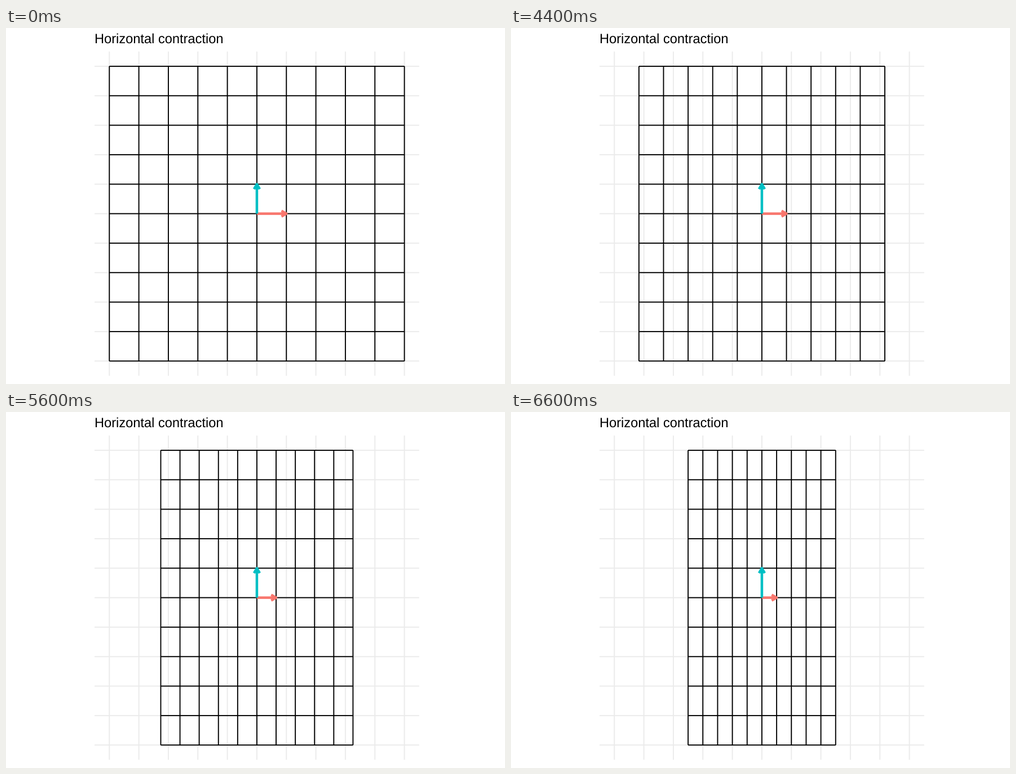
These frames come from a looping animation (885 px wide and 632 px high, 10 s). A matplotlib script:

```python
import numpy as np
import matplotlib.pyplot as plt
from matplotlib.animation import FuncAnimation
from matplotlib.collections import LineCollection

WIDTH, HEIGHT, DPI = 885, 632, 100
PT = 72 / DPI                     # points per pixel
CX, CY = 444.94, 329.6            # origin of the plane, in pixels
UNIT = 52.33
REACH = 5                         # grid runs from -REACH to REACH
PANEL = 5.5                       # background lines run a little further
FRAMES, INTERVAL = 100, 100
START, STEPS, END_SCALE = 33, 33, 0.5
HEAD = 10.08                      # arrow wing length

plt.rcParams["text.hinting"] = "none"
fig = plt.figure(figsize=(WIDTH / DPI, HEIGHT / DPI), dpi=DPI, facecolor="white")
ax = fig.add_axes([0, 0, 1, 1])
ax.set(xlim=(0, WIDTH), ylim=(HEIGHT, 0))
ax.axis("off")


def to_px(points):
    """Map plane coordinates to stage pixels."""
    return np.asarray(points) * [UNIT, -UNIT] + [CX, CY]


def grid_segments(extent, scale=1.0):
    ticks = range(-REACH, REACH + 1)
    rows = [[(-extent, t), (extent, t)] for t in ticks]
    cols = [[(t, -extent), (t, extent)] for t in ticks]
    return [to_px(np.array(s) * [scale, 1]) for s in rows + cols]


def add_lines(segments, color, width):
    lines = LineCollection(segments, colors=color, linewidths=width * PT,
                           capstyle="butt", snap=False)
    ax.add_collection(lines)
    return lines


def add_arrow(color):
    style = dict(color=color, lw=4.5 * PT, solid_capstyle="butt",
                 solid_joinstyle="round", snap=False)
    return [ax.plot([], [], **style)[0] for _ in range(2)]


def place_arrow(arrow, vector):
    shaft, head = arrow
    start, tip = to_px([(0, 0), vector])
    shaft.set_data(*zip(start, tip))
    back = np.arctan2(*(start - tip)[::-1])
    left, right = (tip + HEAD * np.array([np.cos(a), np.sin(a)])
                   for a in (back - np.pi / 6, back + np.pi / 6))
    head.set_data(*zip(left, tip, right))


add_lines(grid_segments(PANEL), "#EBEBEB", 1.9)
grid = add_lines(grid_segments(REACH), "black", 1.9)
x_arrow = add_arrow("#F8766D")
y_arrow = add_arrow("#00BFC4")
ax.text(157.1, 27, "Horizontal contraction", family="Liberation Sans",
        size=23.6 * PT, color="black", ha="left", va="baseline")


def update(frame):
    progress = np.clip((frame - START) / STEPS, 0, 1)
    scale = 1 + (END_SCALE - 1) * progress
    grid.set_segments(grid_segments(REACH, scale))
    place_arrow(x_arrow, (scale, 0))
    place_arrow(y_arrow, (0, 1))
    return [grid, *x_arrow, *y_arrow]


anim = FuncAnimation(fig, update, frames=FRAMES, interval=INTERVAL,
                     repeat=True, repeat_delay=0)
plt.show()
```
